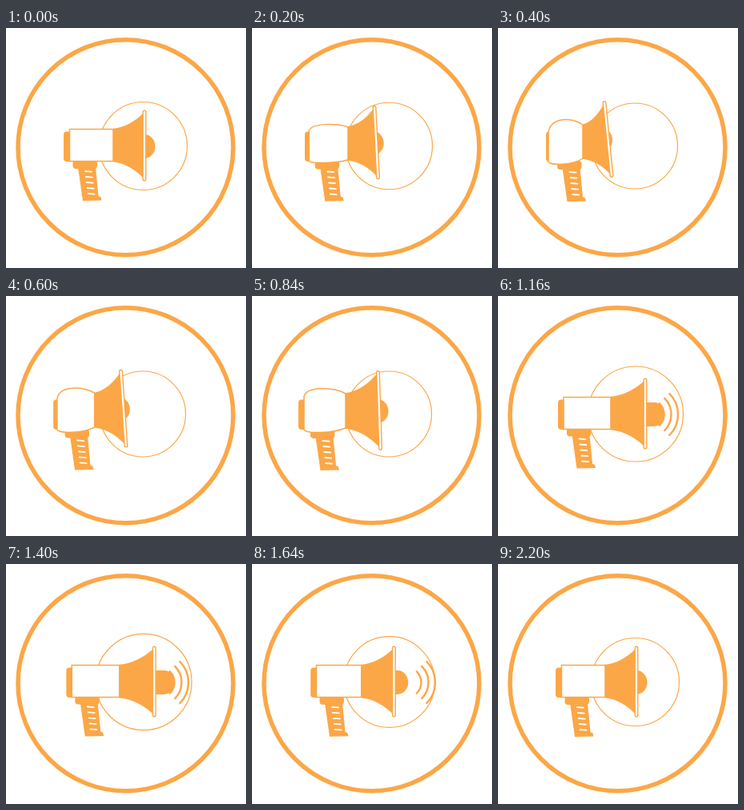
Animation, 300 px wide and 300 px high, one loop 2.72 s. Source, as an HTML page with a canvas:

```html
<!DOCTYPE html>
<html>
<head>
<meta charset="utf-8">
<style>
  html, body { margin: 0; width: 100%; height: 100%; overflow: hidden; background: #fff; }
  canvas { display: block; }
</style>
</head>
<body>
<canvas id="stage" width="300" height="300"></canvas>
<script>
const ctx = document.getElementById('stage').getContext('2d');
const ORANGE = '#fba747', WHITE = '#fff', LOOP = 2720, STEP = 40;

// capX, bodyL, bodyL top/bottom y, bulge top/bottom y, bodyR, bodyR top/bottom y,
// rim top x/y, rim bottom x/y, dome push, handle x/y, circle x/r
const rest    = [72, 79.5, 126.5, 166.5, 126.5, 166.5, 134, 126.5, 166.5, 173, 105, 173, 189, 0, 0, 0, 171.5, 55];
const squash  = [60, 63, 131, 167, 111, 172, 106, 121, 163, 133, 93.5, 142, 184.5, -8, -9.5, 1, 171, 53.5];
const inhale  = [58, 65, 126, 167, 113, 172, 117, 122, 165, 157.5, 95.5, 160.5, 190.5, -2, -10.5, 2, 171, 53.5];
const shout   = [75, 82, 126.5, 166.5, 126.5, 166.5, 141, 126.5, 166.5, 184, 105, 184, 189, 11, 2.5, -0.5, 172, 59.5];

const lerp = (a, b, k) => a + (b - a) * k;
const mix = (p, q, k) => p.map((v, i) => lerp(v, q[i], k));
const ease = k => k * k * (3 - 2 * k);

const keys = [
  [0, rest], [400, squash], [840, inhale], [1080, mix(rest, shout, 1.1)], [1160, shout],
  [1400, mix(rest, shout, 1.12)], [1640, mix(rest, shout, 0.4)], [2000, rest], [LOOP, rest]
];

function poseAt(t) {
  const i = keys.findIndex(k => k[0] > t);
  const [t0, p] = keys[i - 1], [t1, q] = keys[i];
  return mix(p, q, ease((t - t0) / (t1 - t0)));
}

function paint(draw, fill, stroke, width = 1.5) {
  ctx.beginPath();
  draw();
  if (fill) { ctx.fillStyle = fill; ctx.fill(); }
  if (stroke) { ctx.strokeStyle = stroke; ctx.lineWidth = width; ctx.stroke(); }
}

function line(x0, y0, x1, y1, color, width) {
  paint(() => { ctx.moveTo(x0, y0); ctx.lineTo(x1, y1); }, null, color, width);
}

const ring = (x, y, r, width) => paint(() => ctx.arc(x, y, r, 0, 7), null, ORANGE, width);

function drawHandle(x, y) {
  ctx.save();
  ctx.translate(x, y);
  paint(() => ctx.roundRect(83.5, 165, 30.5, 11, 4), ORANGE);
  paint(() => {
    ctx.moveTo(90, 174);
    ctx.lineTo(96, 216);
    ctx.lineTo(119.5, 215.5);
    ctx.lineTo(118.5, 211.5);
    ctx.lineTo(115.5, 210);
    ctx.lineTo(112, 174);
  }, ORANGE);
  for (let i = 0; i < 5; i++) {
    const nx = 99 + i * 0.9, ny = 179 + i * 7;
    line(nx, ny, nx + 8, ny + 0.6, WHITE, 1.8);
  }
  ctx.restore();
}

function drawWaves(t) {
  if (t < 1040 || t >= 1680) return;
  const grow = Math.min(1, lerp(0.55, 1, (t - 1040) / 120));
  const x = t < 1400 ? lerp(188, 191, Math.max(0, (t - 1160) / 240)) : lerp(191, 192, (t - 1400) / 240);
  for (const r of [19.5, 28.5, 37]) {
    paint(() => ctx.arc(x, 148, r * grow, -0.78, 0.78), null, ORANGE, 2.4);
  }
}

function draw(t) {
  const [capX, left, lt, lb, bulgeT, bulgeB, right, rt, rb,
    topX, topY, botX, botY, push, hx, hy, cx, cr] = poseAt(t);

  ctx.fillStyle = WHITE;
  ctx.fillRect(0, 0, 300, 300);
  ctx.lineCap = 'round';
  ring(149.5, 149.2, 134.5, 5.5);
  ring(cx, 147.5, cr, 1.2);
  drawWaves(t);

  // dome
  const mx = (topX + botX) / 2, my = (topY + botY) / 2 + 1;
  paint(() => {
    ctx.moveTo(mx, my - 15);
    ctx.ellipse(mx + push, my, 13.5, 15, 0, -Math.PI / 2, Math.PI / 2);
    ctx.lineTo(mx, my + 15);
  }, ORANGE);

  drawHandle(hx, hy);
  paint(() => ctx.roundRect(capX, 129.5, left - capX + 3, 37.5, [4, 0, 0, 4]), ORANGE);

  // body
  paint(() => {
    const c1 = left + 2, c2 = lerp(left, right, 0.7);
    ctx.moveTo(left, lt);
    ctx.bezierCurveTo(c1, bulgeT, c2, bulgeT, right, rt);
    ctx.lineTo(right, rb);
    ctx.bezierCurveTo(c2, bulgeB, c1, bulgeB, left, lb);
    ctx.closePath();
  }, WHITE, ORANGE);

  // bell
  paint(() => {
    ctx.moveTo(right, rt - 0.7);
    ctx.quadraticCurveTo(lerp(right, topX, 0.55), lerp(rt, topY, 0.15), topX, topY);
    ctx.lineTo(botX, botY);
    ctx.quadraticCurveTo(lerp(right, botX, 0.55), lerp(rb, botY, 0.15), right, rb + 0.7);
    ctx.closePath();
  }, ORANGE);

  // rim
  line(topX, topY, botX, botY, ORANGE, 5);
  line(topX, topY, botX, botY, WHITE, 2.2);
}

function tick() {
  const t = performance.now() % LOOP;
  draw(Math.floor(t / STEP) * STEP);
  requestAnimationFrame(tick);
}
tick();
</script>
</body>
</html>
```
